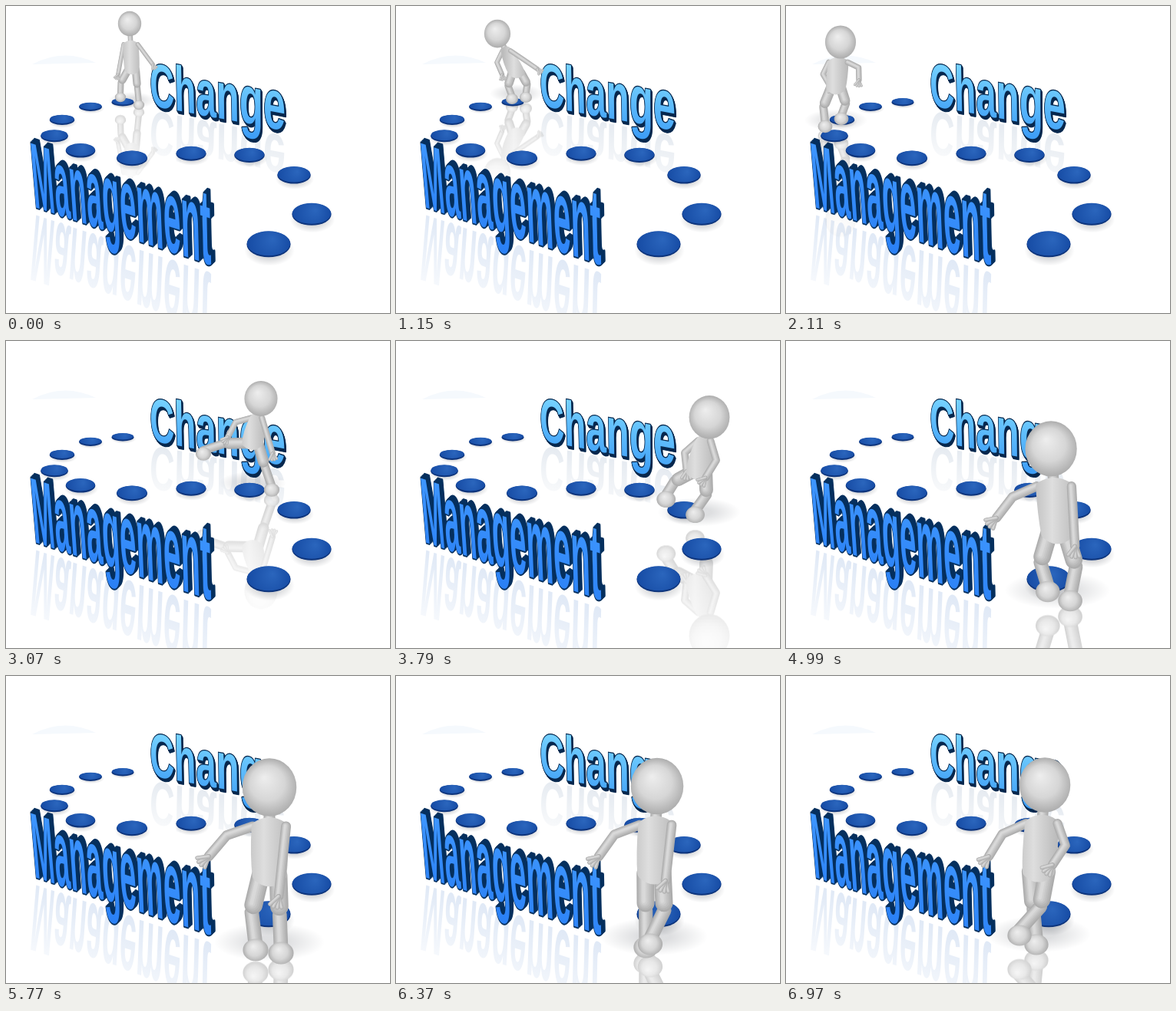
An HTML page with a canvas for the animation above (9.77 s loop, 500 by 400 pixels).

```html
<!DOCTYPE html>
<html>
<head>
<meta charset="utf-8">
<title>Change Management</title>
<style>
html, body { margin: 0; width: 100%; height: 100%; overflow: hidden; background: #fff }
canvas { display: block }
</style>
</head>
<body>
<canvas id="stage" width="500" height="400"></canvas>
<script>
const W = 500, H = 400, LOOP = 9770;
const ctx = document.getElementById('stage').getContext('2d');
const makeLayer = () => Object.assign(document.createElement('canvas'), { width: W, height: H }).getContext('2d');
const figureLayer = makeLayer(), mirrorLayer = makeLayer();
const lerp = (a, b, f) => a + (b - a) * f;
const mix = (p, q, f) => [lerp(p[0], q[0], f), lerp(p[1], q[1], f)];
const grey = v => `rgb(${v},${v},${v})`;

// Discs grow as the path comes nearer
const discs = [
  [152, 125], [110, 131], [73, 148], [63, 169], [97, 188], [164, 198],
  [241, 192], [317, 194], [375, 220], [398, 271], [342, 310]
].map(([x, y]) => ({ x, y, rx: 14.5 + (y - 125) * 0.076, ry: 5 + (y - 125) * 0.064 }));

// Words recede in perspective: sx, sy and lean give the scale and slant at both ends
const change = {
  text: 'Change', x: 188, y: 129.5, slope: 0.187, sx: [43, 53], sy: [79, 93], lean: [0.03, 0],
  depth: [2, 3.5], face: ['#78d4ff', '#3d9df6'], side: '#08294f', mirror: '130,155,185'
};
const management = {
  text: 'Management', x: 37, y: 262, slope: 0.327, sx: [33.5, 42], sy: [121, 140], lean: [0.09, 0.02],
  depth: [5, -5], face: ['#3f97ff', '#2a80f5'], side: '#06305e', mirror: '100,145,210'
};

function eachGlyph(word, draw) {
  ctx.save();
  ctx.font = 'bold 100px "Liberation Sans", Arial, sans-serif';
  ctx.lineJoin = 'round';
  const total = ctx.measureText(word.text).width / 100;
  const [s0, s1] = word.sx;
  let u = 0;
  for (const ch of word.text) {
    const advance = ctx.measureText(ch).width / 100, f = (u + advance / 2) / total;
    const dx = s0 * u + (s1 - s0) * u * u / (2 * total);
    const sx = lerp(s0, s1, f) / 100, sy = lerp(...word.sy, f) / 100, lean = lerp(...word.lean, f);
    const place = (ox, oy, flip = 1) => ctx.setTransform(sx, word.slope * sx, lean * sy, sy * flip,
      word.x + dx + ox, word.y + word.slope * dx + oy);
    draw(ch, place, sy);
    u += advance;
  }
  ctx.restore();
}

function drawWord(word) {
  const [ex, ey] = word.depth;
  eachGlyph(word, (ch, place) => {
    ctx.fillStyle = ctx.strokeStyle = word.side;
    ctx.lineWidth = 3;
    for (let k = 6; k >= 0; k--) {
      place(ex * k / 6, ey * k / 6);
      ctx.fillText(ch, 0, 0);
      ctx.strokeText(ch, 0, 0);
    }
  });
  eachGlyph(word, (ch, place) => {
    const shine = ctx.createLinearGradient(0, -74, 0, 20);
    word.face.forEach((c, i) => shine.addColorStop(i, c));
    ctx.fillStyle = shine;
    place(0, 0);
    ctx.fillText(ch, 0, 0);
  });
}

function drawWordMirror(word) {
  eachGlyph(word, (ch, place, sy) => {
    const fade = ctx.createLinearGradient(0, 0, 0, -80);
    fade.addColorStop(0, `rgba(${word.mirror},.2)`);
    fade.addColorStop(1, `rgba(${word.mirror},.04)`);
    ctx.fillStyle = fade;
    place(0, 8 * sy, -1);
    ctx.fillText(ch, 0, 0);
  });
}

function ellipse(g, x, y, rx, ry, fill) {
  g.fillStyle = fill;
  g.beginPath();
  g.ellipse(x, y, rx, ry, 0, 0, 7);
  g.fill();
}

function drawSoft(x, y, rx, ry, alpha) {
  ctx.save();
  ctx.translate(x, y);
  ctx.scale(rx, ry);
  const fade = ctx.createRadialGradient(0, 0, 0.3, 0, 0, 1);
  fade.addColorStop(0, `rgba(70,75,85,${alpha})`);
  fade.addColorStop(1, 'rgba(70,75,85,0)');
  ellipse(ctx, 0, 0, 1, 1, fade);
  ctx.restore();
}

function drawDisc({ x, y, rx, ry }) {
  drawSoft(x + 1, y + ry * 0.5, rx * 1.15, ry * 1.2, 0.3);
  ellipse(ctx, x, y + 0.5, rx, ry, '#0d347c');
  const top = ctx.createRadialGradient(x + rx * 0.2, y - ry * 0.4, 0, x, y, rx);
  top.addColorStop(0, '#2b66bd');
  top.addColorStop(1, '#164ba4');
  ellipse(ctx, x, y - 0.7, rx - 0.5, ry - 0.8, top);
}

// r is the head size, turn the shoulder width; points: head, hip, hands and feet, left then right
const pose = (t, r, turn, ...pts) => ({ t, r, turn, pts });

const lean = pose(200, 15.5, 0.6, [161, 23], [164, 83], [146, 89], [191, 76], [149, 119], [173, 129]);
const crouch = pose(1150, 17.5, 0.3, [132, 36], [157, 87], [138, 89], [184, 82], [151, 121], [169, 119]);
const jog = pose(2110, 20.5, 0.6, [71, 47], [65, 107], [57, 104], [95, 96], [51, 157], [72, 147]);
const run = pose(3070, 22, 0.3, [332, 75], [321, 133], [289, 125], [347, 146], [257, 147], [346, 194]);
const arrive = pose(4390, 32, 0.75, [348, 134], [368, 238], [288, 224], [406, 240], [363, 284], [387, 307]);
const stand = pose(5470, 36, 0.6, [343, 145], [343, 260], [264, 235], [355, 287], [325, 357], [358, 361]);
const relax = pose(6970, 34, 0.6, [337, 142], [329, 255], [264, 235], [347, 246], [326, 350], [304, 338]);

// One running step per disc, on alternate legs; dir is -1 when heading left
function stride(t, index, dir = 1) {
  const disc = discs[index], base = discs[7], k = disc.rx / base.rx;
  const [head, hip, ...limbs] = run.pts.map(([x, y]) => [disc.x + dir * (x - base.x) * k, disc.y + (y - base.y) * k]);
  const [handL, handR, footL, footR] = limbs;
  const sides = index % 2 ? limbs : [handR, handL, footR, footL];
  return pose(t, run.r * k, run.turn, head, hip, ...sides);
}

const keys = [
  { ...lean, t: 0 }, lean, crouch, stride(1630, 1, -1), jog,
  ...[3, 4, 5, 6].map(i => stride(2110 + 192 * (i - 2), i)), run,
  ...[8, 9].map(i => stride(3070 + 440 * (i - 7), i)), arrive,
  stand, { ...stand, t: 5770 }, relax, { ...relax, t: LOOP }
];

function poseAt(t) {
  const i = keys.findIndex(k => k.t > t), a = keys[i - 1], b = keys[i];
  let f = (t - a.t) / (b.t - a.t);
  const running = a.t >= 1150 && b.t <= 4390;
  if (!running) f = f * f * (3 - 2 * f);
  const r = lerp(a.r, b.r, f), hop = running ? r * 0.3 * Math.sin(Math.PI * f) : 0;
  const pts = a.pts.map((p, j) => mix(p, b.pts[j], f)).map(([x, y]) => [x, y - hop]);
  const floor = Math.max(pts[4][1], pts[5][1]) + hop + r * 0.3;
  return { r, floor, half: r * lerp(a.turn, b.turn, f), pts };
}

// Elbow or knee between two ends; side -1 bends to the left, 1 to the right
function joint(from, to, bone, side, maxBend) {
  const dx = to[0] - from[0], dy = to[1] - from[1], d = Math.hypot(dx, dy) || 1;
  const bend = side * Math.min(maxBend, Math.sqrt(Math.max(0, bone * bone - d * d / 4))) / d;
  const [x, y] = mix(from, to, 0.5);
  return [x + dy * bend, y - dx * bend];
}

function limb(g, width, ...points) {
  g.lineCap = g.lineJoin = 'round';
  for (let k = 0; k < 6; k++) {
    const shift = -k * width * 0.02;
    g.strokeStyle = grey(172 + k * 9);
    g.lineWidth = width * (1 - k * 0.16);
    g.beginPath();
    points.forEach(([x, y]) => g.lineTo(x + shift, y + shift));
    g.stroke();
  }
}

function ball(g, [x, y], rx, ry) {
  const shade = g.createRadialGradient(x - rx * 0.2, y - ry * 0.35, 0, x, y, Math.max(rx, ry));
  shade.addColorStop(0, '#eeeeee');
  shade.addColorStop(0.6, '#d6d6d6');
  shade.addColorStop(1, '#acacac');
  ellipse(g, x, y, rx, ry, shade);
}

function arm(g, r, shoulder, hand, side) {
  const elbow = joint(shoulder, hand, r, side, r * 0.4);
  limb(g, r * 0.36, shoulder, elbow, hand);
  const angle = Math.atan2(hand[1] - elbow[1], hand[0] - elbow[0]);
  for (let k = -1; k <= 2; k++) {
    const a = angle + k * 0.36;
    limb(g, r * 0.15, hand, [hand[0] + Math.cos(a) * r * 0.42, hand[1] + Math.sin(a) * r * 0.42]);
  }
}

function leg(g, r, hip, foot, side) {
  const knee = joint(hip, foot, r * 1.37, side, r * 0.3);
  limb(g, r * 0.52, knee, [foot[0], foot[1] - r * 0.2]);
  limb(g, r * 0.66, hip, mix(hip, knee, 0.8));
  ball(g, foot, r * 0.46, r * 0.4);
}

function drawFigure(g, { r, half, pts }) {
  const [head, hip, handL, handR, footL, footR] = pts;
  const chest = mix(head, hip, 0.48);
  const offset = (p, dx, dy = 0) => [p[0] + dx, p[1] + dy];
  g.clearRect(0, 0, W, H);
  leg(g, r, offset(hip, -r * 0.32), footL, -1);
  leg(g, r, offset(hip, r * 0.32), footR, 1);
  arm(g, r, offset(chest, -half, -r * 0.12), handL, -1);
  limb(g, r * 0.42, chest, head);

  const skin = g.createLinearGradient(hip[0] - r, 0, hip[0] + r, 0);
  skin.addColorStop(0, '#bcbcbc');
  skin.addColorStop(0.4, '#dedede');
  skin.addColorStop(1, '#b0b0b0');
  g.fillStyle = g.strokeStyle = skin;
  g.lineWidth = r * 0.4;
  const topY = chest[1] - r * 0.1, inner = half * 0.75, belly = r * 0.5;
  g.beginPath();
  g.moveTo(chest[0] - inner, topY);
  g.quadraticCurveTo(chest[0], topY - r * 0.3, chest[0] + inner, topY);
  g.quadraticCurveTo(lerp(chest[0], hip[0], 0.6) + belly, lerp(topY, hip[1], 0.6), hip[0] + r * 0.42, hip[1]);
  g.quadraticCurveTo(hip[0], hip[1] + r * 0.4, hip[0] - r * 0.42, hip[1]);
  g.quadraticCurveTo(lerp(chest[0], hip[0], 0.6) - belly, lerp(topY, hip[1], 0.6), chest[0] - inner, topY);
  g.fill();
  g.stroke();

  arm(g, r, offset(chest, half, -r * 0.12), handR, 1);
  ball(g, head, r * 0.98, r * 1.05);
}

function drawFigureMirror({ r, floor }) {
  const g = mirrorLayer;
  g.clearRect(0, 0, W, H);
  g.globalCompositeOperation = 'source-over';
  g.drawImage(figureLayer.canvas, 0, 0);
  const fade = g.createLinearGradient(0, floor - r * 7, 0, floor);
  fade.addColorStop(0, 'rgba(0,0,0,.03)');
  fade.addColorStop(1, 'rgba(0,0,0,.6)');
  g.globalCompositeOperation = 'destination-in';
  g.fillStyle = fade;
  g.fillRect(0, 0, W, H);
  ctx.save();
  ctx.translate(0, 2 * floor);
  ctx.scale(1, -1);
  ctx.drawImage(g.canvas, 0, 0);
  ctx.restore();
}

// The motion advances in steps, with short rests
function stepTime(t) {
  const snap = (start, step) => start + Math.floor((t - start) / step) * step;
  if (t < 200) return 0;
  if (t < 700) return snap(200, 100);
  if (t < 1000) return 700;
  if (t < 1150) return 1000;
  if (t < 5470) return snap(1150, 120);
  if (t < 5770) return 5470;
  return Math.min(snap(5770, 120), 6970);
}

function render(t) {
  const figure = poseAt(t), { r, floor, pts } = figure;
  drawFigure(figureLayer, figure);

  ctx.fillStyle = '#fff';
  ctx.fillRect(0, 0, W, H);
  ctx.fillStyle = '#f5f9fd';
  ctx.beginPath();
  ctx.moveTo(34, 76);
  ctx.quadraticCurveTo(75, 54, 117, 74);
  ctx.fill();

  drawWordMirror(change);
  drawWordMirror(management);
  drawFigureMirror(figure);
  drawSoft(pts[1][0], floor - r * 0.7, r * 2, r * 0.7, 0.18);
  discs.forEach(drawDisc);
  drawWord(change);
  const inFront = t > 3600;
  if (inFront) drawWord(management);
  ctx.drawImage(figureLayer.canvas, 0, 0);
  if (!inFront) drawWord(management);
}

const start = performance.now();
function tick() {
  render(stepTime((performance.now() - start) % LOOP));
  requestAnimationFrame(tick);
}
tick();
</script>
</body>
</html>
```
